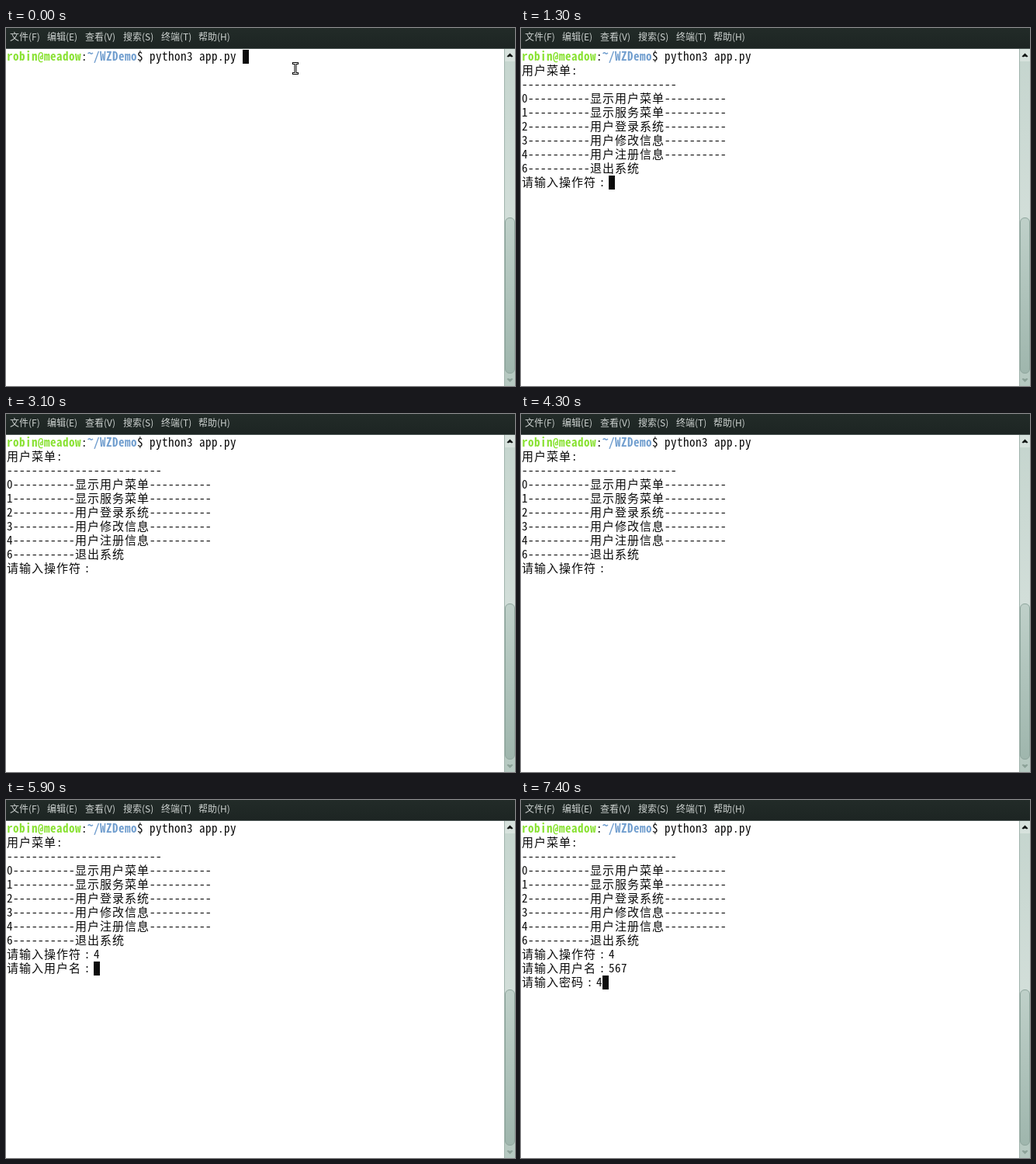
Write an HTML page with a canvas that moves like this. It is 656x461 px and loops after 8 s.

```html
<!DOCTYPE html>
<html lang="zh-CN">
<head>
<meta charset="utf-8">
<title>Terminal</title>
<style>
  html, body { margin: 0; width: 100%; height: 100%; overflow: hidden; background: #fff; }
  canvas { display: block; width: 656px; height: 461px; }
</style>
</head>
<body>
<canvas id="stage" width="656" height="461"></canvas>
<script>
const ctx = document.getElementById('stage').getContext('2d');
const LOOP = 8000;
const SIZE = 15, CELL = 8, ROW = 18, LEFT = 1, TOP = 28, BASE = 14;
const MONO = '"Noto Sans Mono CJK SC", "Noto Sans CJK SC", "Noto Sans Mono", monospace';
const SANS = '"Noto Sans CJK SC", "Noto Sans", sans-serif';
const INK = '#0c0c0c', GREEN = '#8ae234', BLUE = '#729fcf';

const HOST = 'robin@meadow', DIR = '~/WZDemo';
const COMMAND = '$ python3 app.py ';
const dash = '-'.repeat(10);
const MENU = [
  '用户菜单:', '-'.repeat(25),
  ...['显示用户菜单', '显示服务菜单', '用户登录系统', '用户修改信息', '用户注册信息']
    .map((label, i) => i + dash + label + dash),
  '6' + dash + '退出系统', '请输入操作符：'
].join('\n');
const NAME = MENU + '4\n请输入用户名：';
const PASS = NAME + '567\n请输入密码：';

// [start ms, output below the prompt or null, cursor visible]
const steps = [
  [0, null, true], [100, null, false], [700, null, true],
  [1200, '', true], [1300, MENU, true], [1800, MENU, false],
  [2400, MENU, true], [3100, MENU, false], [3700, MENU, true],
  [4300, MENU, false], [4500, MENU + '4', true],
  [4700, NAME, true], [5300, NAME, false], [5900, NAME, true],
  [6000, NAME + '5', true], [6200, NAME + '56', true], [6400, NAME + '567', true],
  [6700, PASS, true], [7200, PASS, false], [7400, PASS + '4', true]
];

function rect(x, y, w, h, color) {
  ctx.fillStyle = color;
  ctx.fillRect(x, y, w, h);
}

function gradient(x0, y0, x1, y1, ...colors) {
  const g = ctx.createLinearGradient(x0, y0, x1, y1);
  colors.forEach((c, i) => g.addColorStop(i / (colors.length - 1), c));
  return g;
}

// Draws one line on the cell grid and returns the column after it.
// Glyphs are slightly narrower than their cells and sit at the left.
function type(text, col, row, color = INK, weight = 400) {
  ctx.font = `${weight} ${SIZE}px ${MONO}`;
  ctx.fillStyle = color;
  ctx.textAlign = 'center';
  for (const ch of text) {
    const span = ch.charCodeAt(0) > 255 ? 2 : 1;
    const x = LEFT + col * CELL + span * SIZE / 4;
    const y = TOP + row * ROW + BASE - (ch === '~' ? 4 : 0);
    ctx.fillText(ch === '：' ? ':' : ch, x, y);
    col += span;
  }
  return col;
}

function menuBar() {
  rect(0, 0, 656, 26, gradient(0, 0, 0, 26, '#222b28', '#1d2523'));
  rect(0, 26, 656, 1, '#4a5552');
  ctx.font = `12px ${SANS}`;
  ctx.fillStyle = '#ccd1cf';
  ctx.textAlign = 'left';
  const items = ['文件(F)', '编辑(E)', '查看(V)', '搜索(S)', '终端(T)', '帮助(H)'];
  const xs = [5, 53, 102, 151, 200, 248];
  items.forEach((item, i) => ctx.fillText(item, xs[i], 16));
}

function arrow(y, dir, color) {
  ctx.fillStyle = color;
  ctx.beginPath();
  ctx.moveTo(649.5, y - 2.5 * dir);
  ctx.lineTo(653.5, y + 1.5 * dir);
  ctx.lineTo(652, y + 2.5 * dir);
  ctx.lineTo(649.5, y + 1.5 * dir);
  ctx.lineTo(647, y + 2.5 * dir);
  ctx.lineTo(645.5, y + 1.5 * dir);
  ctx.fill();
}

function scrollBar() {
  rect(642, 27, 14, 434, gradient(0, 27, 0, 461, '#c5d5ce', '#d2ded9', '#b5c8c0'));
  rect(643, 27, 13, 16, '#d7e2dd');
  rect(643, 445, 13, 16, '#b6c9c1');
  rect(642, 27, 1, 434, '#a0b3ac');
  ctx.beginPath();
  ctx.roundRect(643.5, 244.5, 12, 200, 5.5);
  ctx.fillStyle = gradient(0, 244, 0, 445, '#bfd0c9', '#9fb6ad');
  ctx.fill();
  ctx.strokeStyle = '#8fa69d';
  ctx.lineWidth = 1;
  ctx.stroke();
  arrow(35, 1, '#101413');
  arrow(453.5, -1, '#8ca298');
}

function pointer() {
  for (const [pad, color] of [[1, '#000'], [0, '#fff']]) {
    rect(370 - pad, 45 - pad, 6 + 2 * pad, 1 + 2 * pad, color);
    rect(370 - pad, 58 - pad, 6 + 2 * pad, 1 + 2 * pad, color);
    rect(372.5 - pad, 45, 1 + 2 * pad, 14, color);
  }
}

function draw(now) {
  const t = now % LOOP;
  const [, output, cursor] = steps.findLast(s => s[0] <= t);
  rect(0, 0, 656, 461, '#fff');
  menuBar();
  scrollBar();

  let row = 0;
  let col = type(HOST, 0, 0, GREEN, 700);
  col = type(':', col, 0);
  col = type(DIR, col, 0, BLUE, 700);
  col = type(COMMAND, col, 0);
  if (output === null) {
    pointer();
  } else {
    for (const line of output.split('\n')) col = type(line, 0, ++row);
  }
  if (cursor) rect(LEFT + col * CELL, TOP + row * ROW, CELL, ROW, INK);
}

const start = performance.now();
function tick() {
  draw(performance.now() - start);
  requestAnimationFrame(tick);
}
tick();
</script>
</body>
</html>
```
